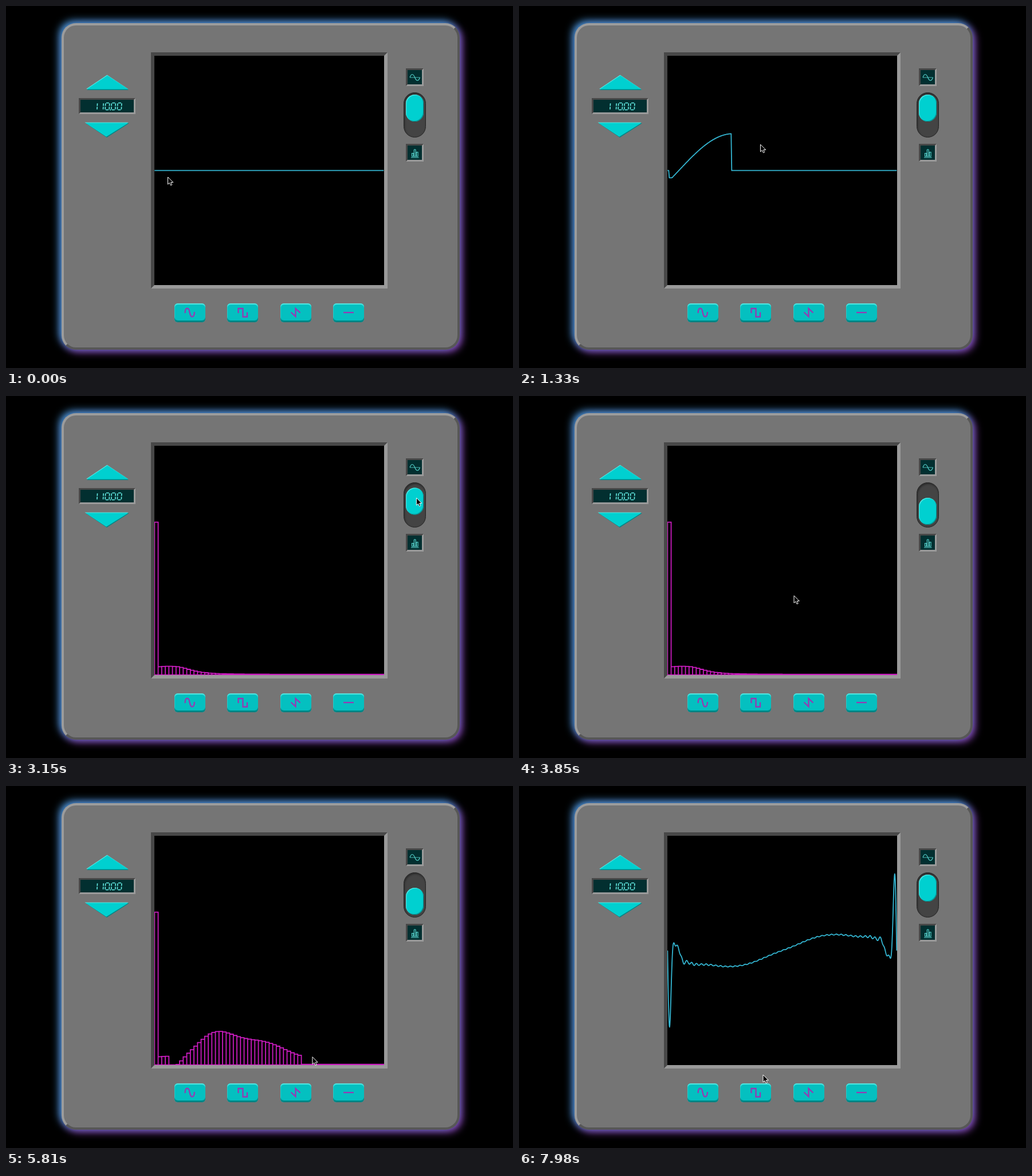
Write an HTML page with a canvas that moves like this. It is 885 px wide and 633 px high and loops after 8000 ms.

```html
<!DOCTYPE html>
<html lang="en">
<head>
<meta charset="utf-8">
<title>Wave drawing synth</title>
<style>
html, body { margin: 0; width: 100%; height: 100%; overflow: hidden; background: #000; }
#stage { position: relative; width: 885px; height: 633px; overflow: hidden; }
#stage > * { position: absolute; box-sizing: border-box; }
.panel {
  left: 97px; top: 30px; width: 695px; height: 571px; border-radius: 25px;
  background: #757575; border: 4px solid; border-color: #9c9c9c #575757 #575757 #9c9c9c;
  box-shadow: -4px -4px 14px #4a9ade, 4px 4px 14px #9146bc;
}
.sunk { border: 3px solid; border-color: #484848 #9a9a9a #9a9a9a #484848; background: #022f30; }
.scope { left: 253px; top: 81px; width: 413px; height: 413px; border-width: 6px; background: #000; }
.readout { left: 127px; top: 161px; width: 99px; height: 28px; }
.icon { left: 698px; width: 31px; height: 31px; }
.track {
  left: 694px; top: 151px; width: 39px; height: 79px; border-radius: 20px;
  background: #444; border: 1px solid #262626; box-shadow: inset 1px 2px 3px #2a2a2a;
}
#knob {
  left: 698px; top: 155px; width: 31px; height: 47px; border-radius: 15.5px;
  background: #00d0d0; box-shadow: inset 1px 1px 1px #5ceae6, inset -1px -1px 1px #008c8c;
}
.button {
  top: 520px; width: 54px; height: 33px; border-radius: 6px; background: #04c0c0;
  box-shadow: inset 0 -3px 1px #018282, inset 0 2px 1px #55e6e2, inset 1px 0 0 #2cd0d0;
}
svg, canvas { left: 0; top: 0; }
</style>
</head>
<body>
<div id="stage">
  <div class="panel"></div>
  <div class="sunk scope"></div>
  <div class="sunk readout"></div>
  <div class="sunk icon" style="top:109px"></div>
  <div class="sunk icon" style="top:241px"></div>
  <div class="track"></div>
  <div id="knob"></div>
  <div class="button" style="left:293.5px"></div>
  <div class="button" style="left:386px"></div>
  <div class="button" style="left:478.5px"></div>
  <div class="button" style="left:570.5px"></div>
  <svg width="885" height="633" fill="none">
    <!-- frequency arrows -->
    <path d="M177 122L214 147H141Z" fill="#008888"/>
    <path d="M176.5 120.5L213 145H140Z" fill="#58eae6"/>
    <path d="M177 121.5L213.5 145.5H141Z" fill="#00d0d0"/>
    <path d="M139 205H215L176 230Z" fill="#008888"/>
    <path d="M137.5 203.5H213.5L175 228Z" fill="#58eae6"/>
    <path d="M139 204.5H213.5L175 228.5Z" fill="#00d0d0"/>
    <!-- view icons -->
    <g stroke="#5ad8d2" stroke-width="1.1">
      <path d="M705 125H722.5" stroke-width=".8"/>
      <path d="M705 125C707 118 711 118 713.7 125S720 132 722.5 125"/>
      <path d="M707 265H720.5M708.5 263V257.5h2.6V263ZM712.3 263V251.5q1.4-1.6 2.8 0V263ZM716.4 263V255.5h2.6V263Z"/>
    </g>
    <!-- wave presets -->
    <g stroke="#9838b4" stroke-width="2.3">
      <path d="M312.5 537C313 526 319 526 320.7 536S328.5 546 329 535"/>
      <path d="M405.5 537V529H413.5V543.5H421V535.5"/>
      <path d="M497.5 535.5L505.5 543V529L513.5 536.5"/>
      <path d="M589 536H607"/>
    </g>
  </svg>
  <canvas id="view" width="885" height="633"></canvas>
</div>
<script>
const ctx = document.getElementById('view').getContext('2d');
const knob = document.getElementById('knob');

const LOOP = 8000, STEP = 70, LAG = 120;
const LEFT = 259.3, WIDTH = 400, MID = 287.7, BASE = 487.7;
const BARS = 64, BAR_W = WIDTH / BARS;
const TO_BARS = 3080, TO_WAVE = 7140;

// Pointer stops: time, x, y. Each move between them is eased.
const stops = [
  [0, 282.5, 299], [745, 262, 300], [2095, 660, 288], [2950, 718, 177],
  [3100, 718, 177], [4500, 288, 488], [4650, 288, 488], [6023, 552, 474],
  [6950, 716, 205], [7150, 716, 205], [7980, 426, 505]
];
const waveStroke = { from: 745, to: 2095, y: x => MID - 64.5 * Math.sin(2 * Math.PI * (Math.max(x, 267) - 279) / 380) };
const barStroke = { from: 4650, to: 6023, y: x => BASE - drawnBar((x - LEFT) / BAR_W - .5) };

const clamp = (v, a, b) => Math.min(b, Math.max(a, v));
const smooth = u => u * u * (3 - 2 * u);
const bell = (i, height, centre, width) => height * Math.exp(-(((i - centre) / width) ** 2));

function drawnBar(i) {
  return Math.max(0, bell(i, 47, 16, 7.5) + bell(i, 40, 29, 11) + bell(i, 9, 46, 5) - bell(i, 9, 5, 2.5));
}

function firstBar(i) {
  return i ? 1 + 14 / (1 + Math.abs((i - 3.5) / 6.5) ** 3) : 267;
}

function pointerAt(t) {
  const n = stops.findIndex(s => s[0] >= t);
  if (n < 1) return stops[n < 0 ? stops.length - 1 : 0].slice(1);
  const [t0, x0, y0] = stops[n - 1], [t1, x1, y1] = stops[n];
  const u = smooth((t - t0) / (t1 - t0));
  const x = x0 + (x1 - x0) * u;
  const stroke = [waveStroke, barStroke].find(s => t >= s.from && t <= s.to);
  return [x, stroke ? stroke.y(x) : y0 + (y1 - y0) * u];
}

// How far right a stroke has been painted.
function reach(stroke, t) {
  return t < stroke.from ? 0 : pointerAt(clamp(t - LAG, stroke.from, stroke.to))[0];
}

// CSS "ease" timing.
function ease(x) {
  if (x <= 0 || x >= 1) return clamp(x, 0, 1);
  const bezier = (s, a, b) => 3 * (1 - s) ** 2 * s * a + 3 * (1 - s) * s * s * b + s ** 3;
  let lo = 0, hi = 1;
  for (let n = 0; n < 20; n++) {
    const s = (lo + hi) / 2;
    if (bezier(s, .25, .25) < x) lo = s; else hi = s;
  }
  return bezier(lo, .1, 1);
}

function barHeights(t) {
  const end = reach(barStroke, t);
  return Array.from({ length: BARS }, (_, i) =>
    i > 3 && LEFT + i * BAR_W <= end ? drawnBar(i) : firstBar(i));
}

function drawBars(t) {
  ctx.strokeStyle = '#cc1cc0';
  ctx.lineWidth = 1.8;
  ctx.beginPath();
  barHeights(t).forEach((h, i) => ctx.rect(LEFT + i * BAR_W, BASE - h, BAR_W, h));
  ctx.stroke();
}

function strokeLine(yAt, step) {
  ctx.strokeStyle = '#34b6d2';
  ctx.lineWidth = 1.8;
  ctx.lineJoin = 'round';
  ctx.beginPath();
  for (let x = 0; x <= WIDTH; x += step) ctx.lineTo(LEFT + x, yAt(LEFT + x));
  ctx.stroke();
}

function drawSketch(t) {
  const end = reach(waveStroke, t);
  strokeLine(x => x >= 261.5 && x <= end ? waveStroke.y(x) : MID, 1);
}

// Sum of sine harmonics weighted by the finished bars, scaled to its peak.
const finalBars = barHeights(TO_WAVE);
const synth = Array.from({ length: 2 * WIDTH + 1 }, (_, n) => finalBars.reduce(
  (sum, h, i) => sum + h * Math.sin((i + 1) * Math.PI * n / WIDTH), 0));
const peak = Math.max(...synth.map(Math.abs));

function drawSynth() {
  strokeLine(x => MID + 134 * synth[Math.round((x - LEFT) * 2)] / peak, .5);
}

// Seven-segment digits; the point takes no width of its own.
function drawReadout(text) {
  const right = new Path2D('M7 .8V5.300M7 6.700V11.200');
  const rest = new Path2D('M1 0H6M1 12H6M0 .8V5.300M0 6.700V11.200');
  ctx.save();
  ctx.strokeStyle = ctx.fillStyle = '#66eee6';
  ctx.lineWidth = 1.6;
  ctx.transform(1, 0, -.06, 1, 152.6, 169.5);
  for (const c of text) {
    if (c === '.') {
      ctx.fillRect(-2.4, 11.2, 1.7, 1.7);
      continue;
    }
    ctx.stroke(right);
    if (c === '0') ctx.stroke(rest);
    ctx.translate(10.6, 0);
  }
  ctx.restore();
}

function drawPointer(t) {
  ctx.save();
  ctx.translate(...pointerAt(t));
  ctx.fillStyle = '#000';
  ctx.strokeStyle = '#fff';
  ctx.lineWidth = 1;
  const arrow = new Path2D('M0 0V12.800L3 10.200L5 14.600L7.200 13.700L5.300 9.400H9.300Z');
  ctx.fill(arrow);
  ctx.stroke(arrow);
  ctx.restore();
}

function draw(time) {
  const t = Math.floor(time % LOOP / STEP) * STEP;
  const shift = ease((t - TO_BARS) / 400) - ease((t - TO_WAVE) / 400);
  knob.style.transform = `translateY(${23 * shift}px)`;

  ctx.clearRect(0, 0, 885, 633);
  ctx.save();
  ctx.beginPath();
  ctx.rect(259, 87, 401, 401);
  ctx.clip();
  if (t < TO_BARS) drawSketch(t);
  else if (t < TO_WAVE) drawBars(t);
  else drawSynth();
  ctx.restore();
  drawReadout('110.00');
  drawPointer(t);
}

const start = performance.now();
function tick() {
  draw(performance.now() - start);
  requestAnimationFrame(tick);
}
tick();
</script>
</body>
</html>
```
